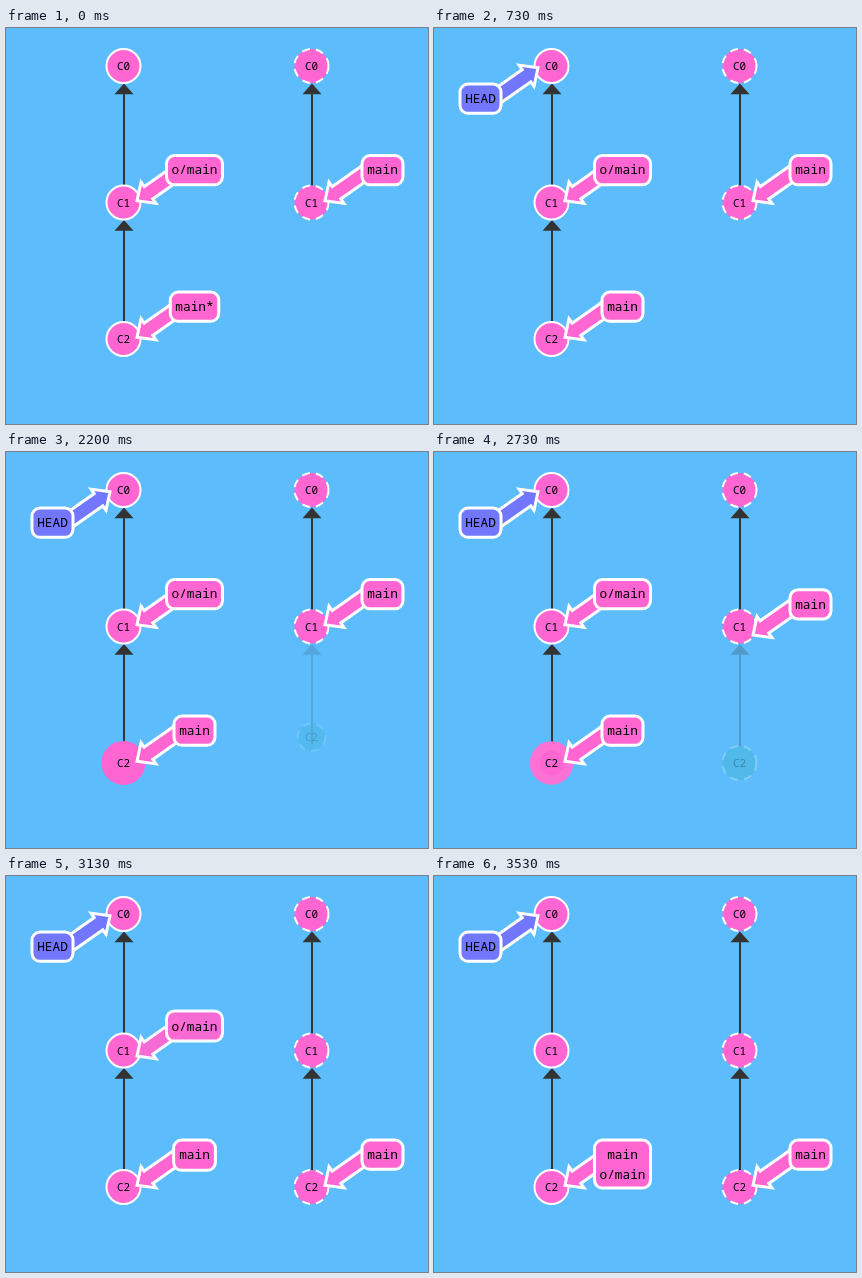
Animation of 422x396 px, one loop 3590 ms. Source, as an HTML page with a canvas:

```html
<!DOCTYPE html>
<html lang="en">
<head>
<meta charset="utf-8">
<title>Commit graph</title>
<style>
  html, body { margin: 0; width: 100%; height: 100%; overflow: hidden; background: #5cbcfc; }
  canvas { display: block; }
</style>
</head>
<body>
<canvas id="stage" width="422" height="396"></canvas>
<script>
const ctx = document.getElementById('stage').getContext('2d');
const LOOP = 3590, FPS = 15;
const LOCAL = 117.5, REMOTE = 305.5;
const Y = [38, 174.5, 311];
const PINK = [255, 102, 210], WHITE = [255, 255, 255], TEAL = [36, 179, 179], VIOLET = [115, 118, 255];
const FADED = 0.2;
const MONO = '"Noto Sans Mono", "DejaVu Sans Mono", monospace';

const clamp = v => Math.min(1, Math.max(0, v));
const lerp = (a, b, p) => a + (b - a) * p;
const mix = (a, b, p) => a.map((v, i) => lerp(v, b[i], p));
const css = c => `rgb(${c.map(Math.round).join(',')})`;

function easeInOut(n) {
  if (n <= 0 || n >= 1) return clamp(n);
  const q = 0.48 - n / 1.04, r = Math.sqrt(0.1734 + q * q);
  const t = Math.cbrt(r - q) + Math.cbrt(-r - q) + 0.5;
  return 3 * (1 - t) * t * t + t * t * t;
}

function bounce(n) {
  const s = 7.5625, p = 2.75;
  if (n < 1 / p) return s * n * n;
  if (n < 2 / p) return s * (n - 1.5 / p) ** 2 + 0.75;
  if (n < 2.5 / p) return s * (n - 2.25 / p) ** 2 + 0.9375;
  return s * (n - 2.625 / p) ** 2 + 0.984375;
}

const phase = (t, start, length = 400, ease = easeInOut) => ease(clamp((t - start) / length));

function write(text, x, y, size, alpha = 1) {
  ctx.globalAlpha = alpha;
  ctx.fillStyle = '#000';
  ctx.font = `${size}px ${MONO}`;
  ctx.textAlign = 'center';
  ctx.fillText(text, x, y);
}

// Line from a child up to the parent's arrowhead
function edge(x, parentY, endY, alpha = 1) {
  const top = parentY + 17.4, base = top + 10.8, end = Math.max(endY, base);
  x += 0.5;
  ctx.globalAlpha = alpha;
  ctx.fillStyle = '#333';
  ctx.beginPath();
  ctx.moveTo(x, top);
  ctx.lineTo(x + 9.5, base);
  ctx.lineTo(x + 1, base);
  ctx.lineTo(x + 1, end);
  ctx.lineTo(x - 1, end);
  ctx.lineTo(x - 1, base);
  ctx.lineTo(x - 9.5, base);
  ctx.fill();
}

function commit(name, x, y, { fill = PINK, stroke = WHITE, width = 2, r = 17, alpha = 1 } = {}) {
  ctx.globalAlpha = alpha;
  ctx.setLineDash(x === REMOTE ? [8, 6] : []);
  ctx.beginPath();
  ctx.arc(x, y, r, 0, 2 * Math.PI);
  ctx.fillStyle = css(fill);
  ctx.fill();
  ctx.strokeStyle = css(stroke);
  ctx.lineWidth = width;
  ctx.stroke();
  ctx.setLineDash([]);
  write(name, x, y + 4, 11, alpha);
}

const labelX = (x, flip) => x + 71 * flip;
const labelY = (y, flip) => y - 32.5 * flip;

// Arrow and box of a branch; flip runs from 1 (right) to -1 (left)
function tag(x, y, w, { h = 29.2, flip = 1, fill = PINK, alpha = 1 } = {}) {
  const ux = 0.819, uy = -0.574;
  const head = 14, wing = 13, shaft = 7.5, tail = 54;
  const outline = [[0, 0], [head, -wing], [head, -shaft], [tail, -shaft], [tail, shaft], [head, shaft], [head, wing]];
  ctx.globalAlpha = alpha;
  ctx.fillStyle = css(fill);
  ctx.strokeStyle = '#fff';
  ctx.lineWidth = 3;
  ctx.beginPath();
  for (const [a, b] of outline) {
    ctx.lineTo(x + flip * (13.5 + a * ux - b * uy), y + flip * (-1.7 + a * uy + b * ux));
  }
  ctx.closePath();
  ctx.fill();
  ctx.stroke();
  ctx.beginPath();
  ctx.roundRect(labelX(x, flip) - w / 2, labelY(y, flip) - 14.4, w, h, 8);
  ctx.fill();
  ctx.stroke();
}

function tagText(text, x, y, flip = 1, alpha = 1) {
  write(text, labelX(x, flip), labelY(y, flip) + 4.3, 12.8, alpha);
}

function draw(t) {
  const detach = phase(t, 290);
  const glow = phase(t, 1095) - phase(t, 2657);
  const born = phase(t, 1836, 800, bounce);
  const grow = phase(t, 1836);
  const push = phase(t, 2657);
  const merge = phase(t, 3062, 440);

  ctx.globalAlpha = 1;
  ctx.fillStyle = '#5cbcfc';
  ctx.fillRect(0, 0, 422, 396);

  for (const x of [LOCAL, REMOTE]) edge(x, Y[0], Y[1] - 17);
  edge(LOCAL, Y[1], Y[2] - 17);
  if (t > 1836) {
    const alpha = lerp(FADED * born, 1, push);
    edge(REMOTE, Y[1], lerp(Y[1], Y[2] - 17, grow), alpha);
    commit('C2', REMOTE, lerp(Y[1], Y[2], born), { fill: mix(TEAL, PINK, push), r: 17 * born, alpha });
  }
  for (const x of [LOCAL, REMOTE]) {
    commit('C0', x, Y[0]);
    commit('C1', x, Y[1]);
  }
  commit('C2', LOCAL, Y[2], { stroke: mix(WHITE, PINK, glow), width: lerp(2, 10, glow) });

  const mainW = lerp(lerp(48.5, 41, detach), 56, merge);
  const stackH = lerp(29.2, 48, merge);
  const originY = lerp(Y[1], Y[2], merge);
  const pushedY = lerp(Y[1], Y[2], push);
  const headY = lerp(Y[2], Y[0], detach), flip = 1 - 2 * detach;

  tag(LOCAL, Y[2], mainW, { h: stackH });
  tag(LOCAL, originY, 56, { h: stackH, alpha: 1 - merge });
  tag(REMOTE, pushedY, 41);
  tagText(detach ? 'main' : 'main*', LOCAL, Y[2]);
  tagText('o/main', LOCAL, originY + 20 * merge);
  tagText('main', REMOTE, pushedY);
  tag(LOCAL, headY, 41, { flip, fill: VIOLET, alpha: detach });
  tagText('HEAD', LOCAL, headY, flip, detach);
}

// The motion advances in steps of 1/15 s
function frame() {
  const t = performance.now() % LOOP;
  draw(Math.floor((t + 4) * FPS / 1000) * 1000 / FPS);
  requestAnimationFrame(frame);
}
frame();
</script>
</body>
</html>
```
